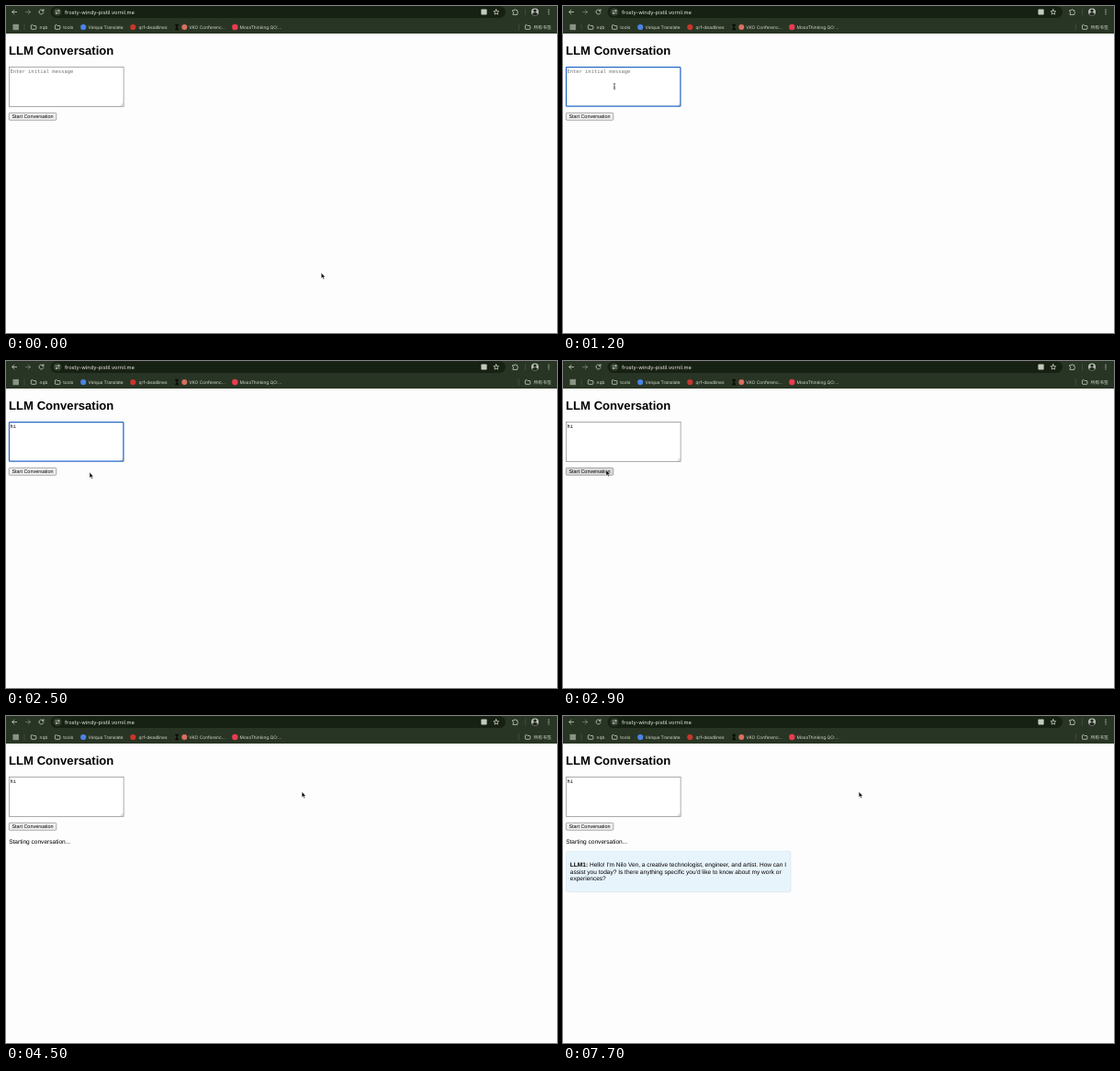
Recreate the animation shown at these times as an HTML page. Size 600 by 356 pixels, loop 8 s.

```html
<!DOCTYPE html>
<html lang="en">
<head>
<meta charset="utf-8">
<title>LLM Conversation</title>
<style>
  html, body { margin: 0; width: 100%; height: 100%; overflow: hidden; background: #fdfdfd; }
  svg { display: block; width: 100vw; height: 100vh; }
  text { text-rendering: geometricPrecision; white-space: pre; }
  .page { font: 6.55px "Liberation Sans", Arial, sans-serif; fill: #000; }
  .mono { font: 5.46px "DejaVu Sans Mono", monospace; }
  .chrome { font: 4.85px Inter, "Noto Sans CJK SC", "Noto Sans CJK", sans-serif; fill: #d3dacd; }
  .line { fill: none; stroke: #d3dacd; stroke-width: .75; stroke-linecap: round; stroke-linejoin: round; }
</style>
</head>
<body>
<svg viewBox="0 0 600 356" preserveAspectRatio="none">
  <defs>
    <path id="folder" class="line" d="M.4 1.1Q.4.5 1 .5H2.3L3 1.3H5.3Q5.9 1.3 5.9 1.9V4.5Q5.9 5.1 5.3 5.1H1Q.4 5.1.4 4.5Z"/>
  </defs>

  <rect width="600" height="356" fill="#fdfdfd"/>
  <rect width="600" height="30" fill="#293524"/>
  <rect x="48.5" y=".3" width="495.5" height="12.6" rx="6.3" fill="#172113"/>

  <!-- Toolbar -->
  <path class="line" d="M11.6 6.5H6.8M9 4.2L6.7 6.5L9 8.8"/>
  <path class="line" opacity=".5" d="M21.6 6.5H26.4M24.2 4.2L26.5 6.5L24.2 8.8"/>
  <path class="line" d="M40.6 5A2.5 2.5 0 1 0 41 7M41 3.7V5.3H39.3"/>
  <circle cx="56" cy="6.5" r="4.6" fill="#2c3828"/>
  <path class="line" d="M54 5.2H55.3M57.1 7.8H58.2"/>
  <circle class="line" cx="57.3" cy="5.2" r=".8"/>
  <circle class="line" cx="54.9" cy="7.8" r=".8"/>
  <text class="chrome" x="64" y="8.7" style="font-size:5.73px;fill:#e4e9e0">frosty-windy-pistil.vornil.me</text>
  <rect x="517.4" y="3.4" width="6.2" height="6.2" rx=".8" fill="#c3cbbd"/>
  <path id="star" class="line"/>
  <path class="line" d="M552 4.7H553.5A1 1 0 0 1 555.5 4.7H556.8V6.2A1 1 0 0 1 556.8 8.1V9.4H552V8A1 1 0 0 0 552 6.1Z"/>
  <path d="M565.5 3V10" stroke="#566150" stroke-width=".5"/>
  <circle cx="576" cy="6.5" r="4" fill="#b9c0b5"/>
  <path d="M573 9.1Q573.4 6.9 576 6.9T579 9.1Q576 11.6 573 9.1Z" fill="#20251e"/>
  <circle cx="576" cy="5.1" r="1.7" fill="#20251e"/>
  <g fill="#d3dacd">
    <circle cx="591" cy="4.2" r=".65"/><circle cx="591" cy="6.5" r=".65"/><circle cx="591" cy="8.8" r=".65"/>
  </g>

  <!-- Bookmarks -->
  <g id="apps" class="line" style="stroke-width:.55"></g>
  <path d="M20 19.5V26.5M558.3 19.5V26.5" stroke="#59654f" stroke-width=".5"/>
  <use href="#folder" x="26.9" y="20.2"/>
  <use href="#folder" x="53" y="20.2"/>
  <use href="#folder" x="565" y="20.2"/>
  <circle cx="84.2" cy="23" r="3.1" fill="#4b82e8"/>
  <circle cx="138.3" cy="23" r="3.1" fill="#c9362b"/>
  <path d="M184.3 20H188L186.4 23L188 26H184.3L185.9 23Z" fill="#0a0d08" stroke="#0a0d08" stroke-width=".5"/>
  <circle cx="194.3" cy="23" r="3" fill="#d8705f"/>
  <circle cx="249.3" cy="23" r="3.2" fill="#e83c50"/>
  <g id="bookmarks" class="chrome"></g>

  <!-- Page -->
  <g class="page">
    <text x="3.1" y="53" font-weight="bold" style="font-size:13.1px">LLM Conversation</text>
    <rect id="field" fill="#fff"/>
    <path d="M124.6 109L127.7 105.9M126.3 109L127.7 107.6" stroke="#777" stroke-width=".4"/>
    <text id="entry" class="mono" x="4.4" y="72.7"></text>
    <path id="caret" d="M4.6 68V73.8" stroke="#000" stroke-width=".45"/>
    <rect id="button" x="3.3" y="116.3" width="51.5" height="8" rx="1.1" stroke="#767676" stroke-width=".6"/>
    <text x="6.4" y="122.2" style="font-size:5.46px">Start Conversation</text>
    <text id="status" x="3.2" y="138.8">Starting conversation...</text>
    <g id="reply">
      <rect x="3.4" y="147.4" width="244.6" height="44.2" rx="2" fill="#e8f4fc" stroke="#c9dfec" stroke-width=".5"/>
      <text x="7.8" y="163.9"><tspan font-weight="bold">LLM1:</tspan> Hello! I'm Nilo Ven, a creative technologist, engineer, and artist. How can I</text>
      <text x="7.8" y="171.5">assist you today? Is there anything specific you'd like to know about my work or</text>
      <text x="7.8" y="179.1">experiences?</text>
    </g>
  </g>

  <path id="arrow" d="M0 0V6L1.4 4.8L2.4 7L3.4 6.5L2.4 4.4H4.2Z" fill="#000" stroke="#fff" stroke-width=".45"/>
  <path id="beam" d="M-1.2 -3Q0 -3 0 -2.2Q0 -3 1.2 -3M0 -2.2V2.2M-1.2 3Q0 3 0 2.2Q0 3 1.2 3M-.7 .8H.7" fill="none" stroke="#222" stroke-width=".65"/>
</svg>
<script>
const LOOP = 8000, STEP = 100;
const $ = id => document.getElementById(id);
const show = (id, on) => $(id).setAttribute("visibility", on ? "visible" : "hidden");
const set = (id, attrs) => { for (const k in attrs) $(id).setAttribute(k, attrs[k]); };

// Pointer stops: time, x, y
const stops = [
  [0, 343.3, 290.5], [700, 56, 87.5], [2300, 56, 87.5], [2500, 91, 121.3],
  [2800, 47, 118.8], [4100, 47, 118.8], [4500, 322.2, 82.5], [LOOP, 322.2, 82.5]
];

function pointerAt(t) {
  const i = stops.findIndex(s => s[0] > t);
  const [t0, x0, y0] = stops[i - 1], [t1, x1, y1] = stops[i];
  const p = (t - t0) / (t1 - t0), e = p * p * (3 - 2 * p);
  return [x0 + (x1 - x0) * e, y0 + (y1 - y0) * e];
}

const inside = (x, y, l, t, r, b) => x >= l && x <= r && y >= t && y <= b;

function buildChrome() {
  const labels = [
    [36.6, "nqb"], [62.2, "tools"], [89.6, "Velqua Translate"], [144.6, "qrf-deadlines"],
    [199.2, "VKO Conferenc..."], [254.6, "MossThinking.QO:..."], [574.4, "所有书签"]
  ];
  $("bookmarks").innerHTML = labels.map(([x, s]) => `<text x="${x}" y="24.8">${s}</text>`).join("");
  let cells = "";
  for (let i = 0; i < 9; i++)
    cells += `<rect x="${8.2 + i % 3 * 2.1}" y="${20.3 + Math.floor(i / 3) * 2.1}" width="1.2" height="1.2"/>`;
  $("apps").innerHTML = cells;
  const points = Array.from({ length: 10 }, (_, i) => {
    const r = i % 2 ? 1.35 : 3, a = i * Math.PI / 5;
    return [533.8 + r * Math.sin(a), 6.7 - r * Math.cos(a)].map(v => v.toFixed(2));
  });
  set("star", { d: "M" + points.join("L") + "Z" });
}

function render(ms) {
  const t = Math.floor(ms / STEP) * STEP;
  const [x, y] = pointerAt(t);
  const overField = inside(x, y, 3, 66, 128, 109);
  const overButton = inside(x, y, 3, 116, 55, 124.5);
  const hidden = t >= 1900 && t < 2400; // pointer hides while typing
  const focused = t >= 1000 && t < 2900;
  const typed = "hi".slice(0, t < 1900 ? 0 : t < 2000 ? 1 : 2);

  set("field", focused
    ? { x: 3.5, y: 66.7, width: 124.4, height: 42.5, rx: .8, stroke: "#2668c5", "stroke-width": 1.25 }
    : { x: 3.4, y: 66.5, width: 124.7, height: 42.9, rx: 0, stroke: "#767676", "stroke-width": .6 });
  $("entry").textContent = typed || "Enter initial message";
  $("entry").style.fill = typed ? "#000" : "#757575";
  show("caret", t >= 1400 && t < 1900);
  set("button", { fill: overButton ? "#dadada" : "#efefef" });
  show("status", t >= 3000);
  show("reply", t >= 6500);

  for (const id of ["arrow", "beam"]) set(id, { transform: `translate(${x} ${y})` });
  show("arrow", !hidden && !overField);
  show("beam", !hidden && overField);
}

buildChrome();
render(0);
const start = performance.now();
function tick() {
  render((performance.now() - start) % LOOP);
  requestAnimationFrame(tick);
}
requestAnimationFrame(tick);
</script>
</body>
</html>
```
